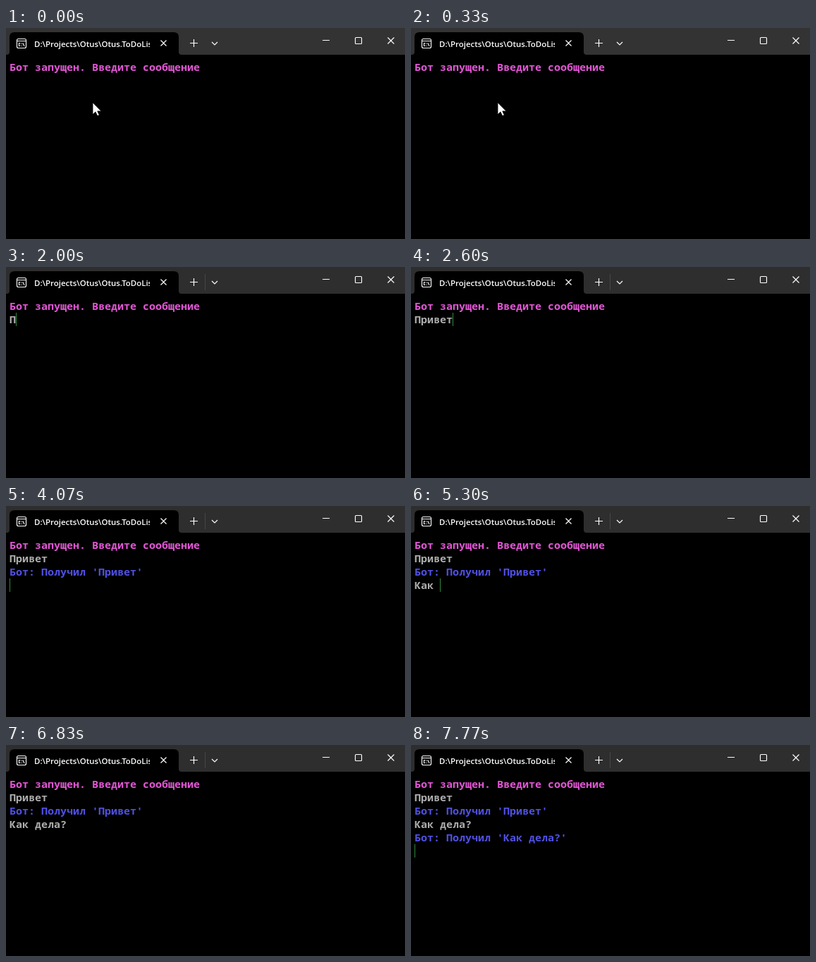
An HTML page for the animation above (8000 ms loop, 566 by 300 pixels).

```html
<!DOCTYPE html>
<html lang="ru">
<head>
<meta charset="utf-8">
<style>
  html, body { margin: 0; width: 100%; height: 100%; overflow: hidden; background: #000; }
  svg { display: block; }
  .term { font: 600 15px "Noto Sans Mono", monospace; white-space: pre; }
  .title { font: 600 11.45px "Open Sans", sans-serif; fill: #fff; }
  .icons { fill: none; stroke: #fff; stroke-width: 1.15; }
</style>
</head>
<body>
<svg width="566" height="300" viewBox="0 0 566 300">
  <rect width="566" height="300"/>
  <rect id="bar" width="566" height="38"/>
  <path d="M1 38q4 0 4-4V13q0-7 7-7H238q7 0 7 7V34q0 4 4 4z"/>
  <clipPath id="clip"><rect x="40" y="8" width="164" height="28"/></clipPath>
  <text class="title" x="40" y="27" clip-path="url(#clip)">D:\Projects\Otus\Otus.ToDoList</text>
  <g class="icons">
    <rect x="15.5" y="15.5" width="13" height="13" rx="2"/>
    <path d="M16 18.5H28M20.5 21.5H18.5V25.5H20.5M22.5 22v1M22.5 25v1M24 21.5l2 4.5"/>
    <path d="M219.5 17.5l8 8m0-8l-8 8M261 21.5h11M266.5 16v11M292 20l4 4 4-4"/>
    <path d="M449 17.5h10M541.5 13.5l9 9m0-9l-9 9"/>
    <rect x="495.5" y="13.5" width="9" height="9" rx="1"/>
  </g>
  <path id="divider" d="M282.5 10V33" stroke="#484848"/>
  <g id="rows" class="term"></g>
  <rect id="caret" width="1" height="19" fill="#2f8a3a"/>
  <path id="mouse" d="M0 0V17L4 13.3 6.6 19 9.3 17.8 6.8 12.2H12z" fill="#fff" stroke="#000" stroke-width=".8"/>
</svg>
<script>
const LOOP = 8000, CELL = 9, ROW = 19, LEFT = 5, BASELINE = 61;
const FOCUS = 670, BLINK = 500;
const GREETING = "#e356d6", INPUT = "#adadad", REPLY = "#5050e4";
const $ = id => document.getElementById(id);
const show = (el, on) => el.setAttribute("visibility", on ? "visible" : "hidden");

// Everything written to the console, in order of time
const output = [], nodes = [];

function newRow(color) {
  const el = document.createElementNS("http://www.w3.org/2000/svg", "text");
  el.setAttribute("x", LEFT);
  el.setAttribute("y", BASELINE + nodes.length * ROW);
  el.setAttribute("fill", color);
  nodes.push($("rows").appendChild(el));
}

const write = (text, at) => output.push({ text, at, row: nodes.length - 1 });

function print(text, color, at) {
  newRow(color);
  write(text, at);
  newRow(INPUT);
  write("", at);
}

// Keys pressed at an even pace, the first at `from` and the last at `to`
function type(text, from, to) {
  const pace = (to - from) / (text.length - 1);
  [...text].forEach((char, i) => write(char, from + i * pace));
}

function reply(message, at) {
  print(`Бот: Получил '${message}'`, REPLY, at);
}

print("Бот запущен. Введите сообщение", GREETING, 0);
type("Привет", 2000, 2600);
reply("Привет", 3030);
type("Как ", 4730, 5300);
type("дела?", 6000, 6330);
reply("Как дела?", 7765);

function drawConsole(t) {
  const written = output.filter(item => item.at <= t);
  const rowText = row => written.filter(item => item.row === row).map(item => item.text).join("");
  nodes.forEach((el, row) => el.textContent = rowText(row));

  // The caret stays lit for one blink after each change
  const { row, at } = written[written.length - 1];
  const idle = t - Math.max(at, FOCUS);
  $("caret").setAttribute("x", LEFT + rowText(row).length * CELL);
  $("caret").setAttribute("y", BASELINE - 15 + row * ROW);
  show($("caret"), idle >= 0 && Math.floor(idle / BLINK) % 2 === 0);
}

function drawMouse(t) {
  const p = Math.min(Math.max((t - 900) / 200, 0), 1);
  const eased = 1 - (1 - p) ** 2.5;
  $("mouse").setAttribute("transform", `translate(${123 + 62 * eased} ${106 + 16 * eased})`);
  show($("mouse"), t < 2000);
}

function draw(t) {
  const focused = t >= FOCUS;
  $("bar").setAttribute("fill", focused ? "#2e2e2e" : "#333");
  show($("divider"), focused);
  drawConsole(t);
  drawMouse(t);
}

const start = performance.now();
function tick() {
  draw((performance.now() - start) % LOOP);
  requestAnimationFrame(tick);
}
tick();
</script>
</body>
</html>
```
